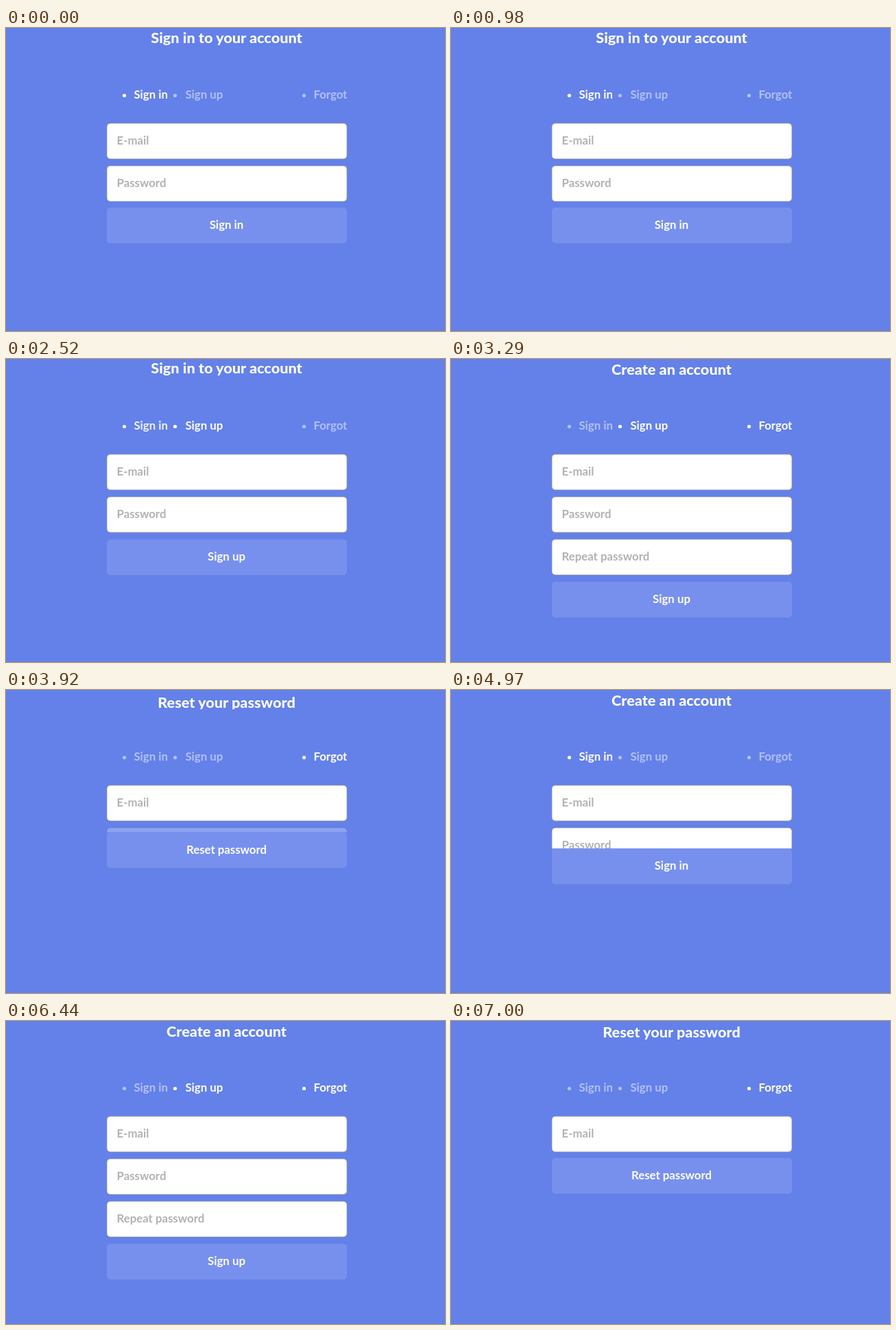
Animation of 640x442 px, one loop 7.07 s. Source, as an HTML page:

```html
<!DOCTYPE html>
<html lang="en">
<head>
<meta charset="utf-8">
<title>Sign in form</title>
<style>
  html, body { margin: 0; width: 100%; height: 100%; overflow: hidden; background: #6481e9; }
  svg { display: block; width: 640px; height: 442px; }
  text { font: 700 16.8px Lato, "Open Sans", sans-serif; fill: #fff; }
  .title { font-size: 21.7px; font-weight: 800; }
  .mid { text-anchor: middle; }
  .tab circle { fill: #fff; }
  .field rect { fill: #fff; stroke: #8b90a4; stroke-width: .8; }
  .field text { fill: #b2b2b2; }
</style>
</head>
<body>
<svg viewBox="0 0 640 442">
  <clipPath id="head"><rect width="640" height="28"/></clipPath>
  <clipPath id="body"><rect id="reveal" width="640" height="262"/></clipPath>
  <g clip-path="url(#head)">
    <g id="titles">
      <text class="title mid" x="321.5" y="22">Sign in to your account</text>
      <text class="title mid" x="321.5" y="53">Create an account</text>
      <text class="title mid" x="321.5" y="84">Reset your password</text>
    </g>
  </g>
  <g class="tab"><circle cx="172.5" cy="98.5" r="2.6"/><text x="186.4" y="103">Sign in</text></g>
  <g class="tab"><circle cx="246.5" cy="98.5" r="2.6"/><text x="261.4" y="103">Sign up</text></g>
  <g class="tab"><circle cx="434.5" cy="98.5" r="2.6"/><text x="448.4" y="103">Forgot</text></g>
  <g clip-path="url(#body)">
    <g class="field"><rect x="147" y="139" width="350" height="52" rx="5"/><text x="161.5" y="170">E-mail</text></g>
    <g class="field"><rect x="147" y="201" width="350" height="52" rx="5"/><text x="161.5" y="232">Password</text></g>
    <g class="field"><rect x="147" y="263" width="350" height="52" rx="5"/><text x="161.5" y="294">Repeat password</text></g>
  </g>
  <g id="button">
    <rect x="147" width="350" height="52" rx="5" fill="#7890ed"/>
    <text id="label" class="mid" x="321.5" y="31">Sign in</text>
  </g>
</svg>
<script>
const LOOP = 7070, SLIDE = 400;
const pages = [
  { label: 'Sign in', button: 262, title: 0 },
  { label: 'Sign up', button: 325, title: -30 },
  { label: 'Reset password', button: 200, title: -60 }
];
// [time, page]
const clicks = [[-SLIDE, 0], [2480, 1], [3590, 2], [4770, 0], [5800, 1], [6500, 2]];
// spans [from, to] in which each tab is hovered or active
const lit = [
  [[-500, 2480], [4400, 5800]],
  [[1750, 3590], [4180, 4340], [5650, 6500]],
  [[3080, 4770], [6200, 9000]]
];
const passwordShown = [[-500, 3790], [4770, 6700]];
const repeatShown = [[2480, 3790], [5800, 6700]];

const $ = id => document.getElementById(id);
const tabs = document.querySelectorAll('.tab');
const fields = document.querySelectorAll('.field');
const clamp = x => Math.min(1, Math.max(0, x));
const mix = (a, b, p) => a + (b - a) * p;
const fade = (spans, t, time) => Math.max(...spans.map(
  ([from, to]) => clamp((t - from) / time) * (1 - clamp((t - to) / time))));

// cubic-bezier(.42, 0, .58, 1), solved by bisection
function easeInOut(x) {
  let lo = 0, hi = 1;
  for (let i = 0; i < 20; i++) {
    const u = (lo + hi) / 2, v = 1 - u;
    if (1.26 * u * v * v + 1.74 * u * u * v + u ** 3 < x) lo = u; else hi = u;
  }
  return lo * lo * (3 - 2 * lo);
}

const moveY = (el, y) => el.setAttribute('transform', `translate(0 ${y})`);

function draw() {
  const t = performance.now() % LOOP;
  const last = clicks.findLastIndex(([time]) => time <= t);
  const [start, now] = clicks[last];
  const page = pages[now];
  const prev = pages[last ? clicks[last - 1][1] : now];
  const p = easeInOut(clamp((t - start) / SLIDE));
  const top = mix(prev.button, page.button, p);

  moveY($('titles'), mix(prev.title, page.title, p));
  moveY($('button'), top);
  $('reveal').setAttribute('height', top);
  $('label').textContent = page.label;
  tabs.forEach((tab, i) => tab.style.opacity = mix(.5, 1, fade(lit[i], t, 200)));
  fields[1].style.opacity = fade(passwordShown, t, 180);
  fields[2].style.opacity = fade(repeatShown, t, 180);
  requestAnimationFrame(draw);
}
draw();
</script>
</body>
</html>
```
